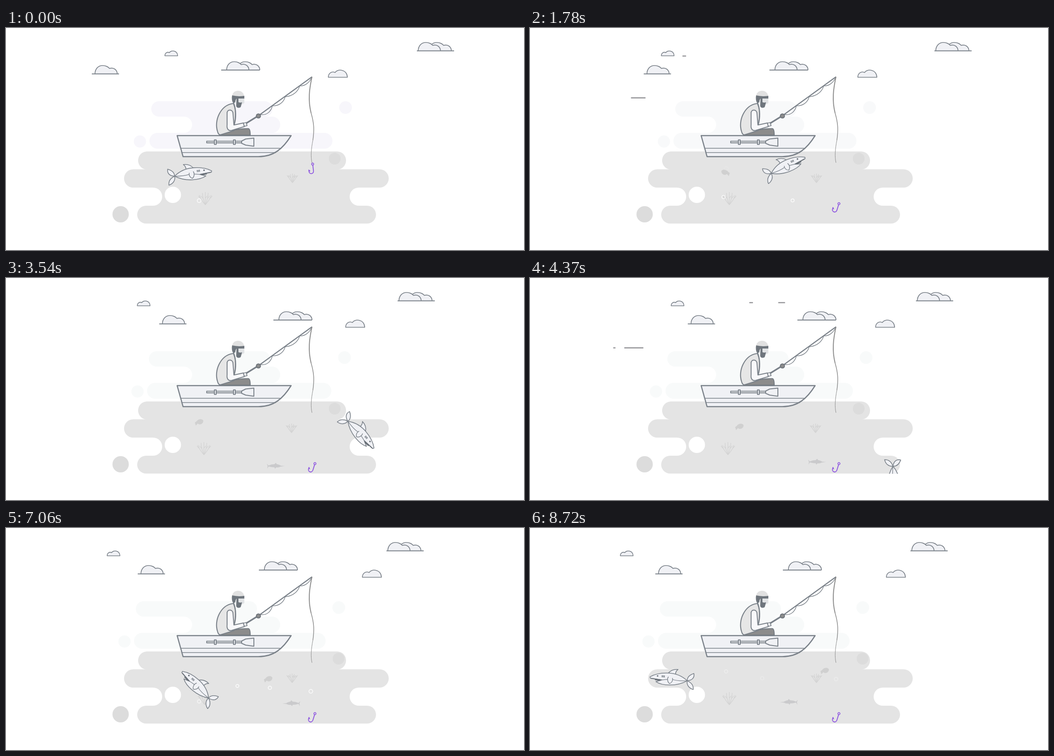
Animation, 1141 px wide and 491 px high, one loop 8820 ms. Source, as an HTML page with a canvas:

```html
<!DOCTYPE html>
<html lang="en">
<head>
<meta charset="utf-8">
<title>Fishing</title>
<style>
html, body { margin: 0; width: 100%; height: 100%; overflow: hidden; background: #fff; }
canvas { display: block; }
</style>
</head>
<body>
<canvas id="stage" width="1141" height="491"></canvas>
<script>
const ctx = document.getElementById('stage').getContext('2d');
const LOOP = 8820;
const INK = '#7a8189', PAPER = '#f0f1f5', WATER = '#e4e4e4', SHADE = '#dcdcdc', GREY = '#8c8c8c';

const clamp = u => Math.max(0, Math.min(1, u));
const smooth = u => u * u * (3 - 2 * u);
const easeOut = (u, power) => 1 - (1 - u) ** power;
const random = seed => Math.abs(Math.sin(seed * 12.9898) * 43758.5453) % 1;
const radians = degrees => degrees * Math.PI / 180;

// Eases through time, value pairs and rests at each of them.
function track(t, ...keys) {
  let value = keys[1];
  for (let i = 2; i < keys.length; i += 2) {
    const u = clamp((t - keys[i - 2]) / (keys[i] - keys[i - 2]));
    value += (keys[i + 1] - keys[i - 1]) * smooth(u);
  }
  return value;
}

function shape(d, fill, stroke, width = 1.8) {
  const path = new Path2D(d);
  if (fill) { ctx.fillStyle = fill; ctx.fill(path); }
  if (stroke) { ctx.strokeStyle = stroke; ctx.lineWidth = width; ctx.stroke(path); }
}

function pill(x0, x1, y0, y1, fill) {
  ctx.fillStyle = fill;
  ctx.beginPath();
  ctx.roundRect(x0, y0, x1 - x0, y1 - y0, (y1 - y0) / 2);
  ctx.fill();
}

function circle(x, y, r, fill, stroke, width) {
  ctx.beginPath();
  ctx.arc(x, y, r, 0, Math.PI * 2);
  if (fill) { ctx.fillStyle = fill; ctx.fill(); }
  if (stroke) { ctx.strokeStyle = stroke; ctx.lineWidth = width; ctx.stroke(); }
}

function placed(x, y, draw, { angle = 0, sx = 1, sy = 1 } = {}) {
  ctx.save();
  ctx.translate(x, y);
  ctx.scale(sx, sy);
  ctx.rotate(angle);
  draw();
  ctx.restore();
}

// Sky

function drawHaze(t) {
  const drift = track(t, 2750, 0, 5930, 1);
  const mix = track(t, 0, 0, 2600, 1);
  const tint = `rgb(${247 + mix}, ${246 + 4 * mix}, ${251 - mix})`;
  const far = 34 * drift, near = 15 * drift;
  pill(320 - far, 587 - far, 162, 196, tint);
  pill(450, 604, 196, 232, tint);
  pill(316 - far, 719 - near, 232, 267, tint);
  ctx.fillStyle = tint;
  ctx.fillRect(385, 195, 150, 38);
  pill(340, 410, 196, 232, '#fff');
  circle(295 - far, 251, 13.5, tint);
  circle(748 - near, 176, 14, tint);
}

const hump = x => placed(x, 0, () =>
  shape('M0 0C0 -11 7 -18.5 17 -18.5C24 -18.5 30 -15 32 -12C41 -15 49 -9 49 0', PAPER, INK, 1.7));

function bank(x, y, humps, left, right) {
  placed(x, y, () => {
    humps.forEach(hump);
    shape(`M${left} 0H${right}`, null, INK);
  });
}

function puff(x, y, scale) {
  placed(x, y, () => shape('M0 0C0 -9 7 -14 15 -10.5C19 -19 41 -19 42 0Z', PAPER, INK, 1.6 / scale),
    { sx: scale, sy: scale });
}

function drawClouds(t) {
  bank(track(t, 0, 908, 6000, 841), 50.5, [24, 0], -3, 79);
  bank(track(t, 900, 486, 2750, 601, 4370, 601, 5900, 569), 93, [24, 0], -12, 73);
  bank(track(t, 0, 196, 4200, 355, 8200, 283), 101.5, [0], -7, 53);
  puff(track(t, 0, 710, 7000, 785), 109, 1);
  puff(track(t, 0, 350, 2700, 267, 4370, 311, 8200, 199), 61.5, .67);
}

// A dash blown along a line, with an optional smaller dash lagging behind it.
function gust(t, start, end, y, from, to, length, { width = 2.4, tail = 0, lag = 0 } = {}) {
  const u = (t - start) / (end - start);
  if (u <= 0 || u >= 1) return;
  const head = from + (to - from) * smooth(u);
  const dash = (right, size) =>
    right > from && shape(`M${Math.max(from, right - size)} ${y}H${right}`, null, '#929296', width);
  dash(head, length);
  if (tail) dash(head - lag * (1 + u / 2), tail);
}

function drawGusts(t) {
  gust(t, 1540, 2760, 154.5, 171, 992, 32);
  gust(t, 3950, 6150, 154.5, 171, 992, 42, { tail: 5, lag: 56 });
  gust(t, 1540, 2100, 62, 320, 380, 8);
  gust(t, 3950, 4750, 54.5, 400, 700, 15, { tail: 8, lag: 56 });
  gust(t, 5800, 6400, 84.5, 250, 460, 14, { width: 1.6 });
}

// Sea

function drawSea(t) {
  pill(291, 749, 273, 313, WATER);
  pill(260, 843, 312.5, 353, WATER);
  ctx.fillStyle = WATER;
  ctx.fillRect(310, 300, 420, 30);
  ctx.fillRect(310, 340, 480, 70);
  pill(289, 815, 393, 432.5, WATER);
  pill(270, 344, 353, 393, '#fff');
  pill(757, 835, 353, 393, '#fff');
  circle(367.5, 369, 18, '#fff');
  circle(252.5, 412, 18, SHADE);
  circle(track(t, 4300, 724, 5930, 732.5), 289, 13, SHADE);
}

function drawWeed(x, y, size) {
  for (let i = -2; i <= 2; i++) {
    const tipX = x + i * size * .23, tipY = y - size * (1 - .06 * i * i);
    const midX = x + i * size * .2, midY = y - size * .45;
    shape(`M${x} ${y}Q${midX} ${midY} ${tipX} ${tipY}M${midX} ${midY - 2}l${i < 0 ? -4 : 4} -5`, null, '#d3d3d3', 1.3);
  }
}

function drawWeeds(t) {
  const sway = track(t, 1780, 0, 2710, -3, 4370, -3, 8720, 0);
  drawWeed(439 + sway, 391, 28);
  drawWeed(631 + sway * .7, 342, 20);
}

function drawFish(t) {
  const since = t - 2710;
  ctx.globalAlpha = clamp((t - 300) / 700);
  placed(390 + .0432 * Math.abs(since), 327.5 - 13.5 * Math.cos(since * Math.PI / 3220), () =>
    shape('M-4 3C-1 8 8 6 9 -1C8 -7 -2 -7 -6 -2L-10 0L-9 7Z', '#d0d0d0'),
    { angle: -.15, sx: track(t, 2600, -1, 3000, 1) });

  const u = (t - 5930) / 2790;
  const x = u < 0 ? 704 + 128 * u : 704 - 134 * easeOut(clamp(u), 1.6);
  ctx.globalAlpha = clamp((t - 3000) / 500);
  placed(x, 390 - (u < 0 ? 30 : 5) * u, () =>
    shape('M-20 -5L-16 -1Q-10 -4 -3 -4L0 -7L2 -4Q8 -3 11 -.5L20 0L10 1.5Q6 4 1 3L-2 6L-3 3Q-10 3 -16 1L-19 6L-18 0Z', '#cacacc'),
    { sx: track(t, 5600, 1, 6120, -1) });
  ctx.globalAlpha = 1;
}

// Every wave sends one bubble up from each vent; the first vent leads.
const VENTS = [425, 506, 578, 669], WAVES = [-100, 1480, 4800, 5950, 7000];

function drawBubbles(t) {
  WAVES.forEach((start, wave) => VENTS.forEach((x, vent) => {
    const chance = random(wave * VENTS.length + vent + 1);
    const age = t - start - (vent && 120 + 400 * chance);
    const life = vent ? 1500 : 1950;
    if (age <= 0 || age >= life) return;
    ctx.globalAlpha = .9 * Math.min(1, age / 80, (life - age) / 500);
    circle(x + age * .004, 386 - age * .04, 3.2 + chance, null, '#fff', 1.5);
  }));
  ctx.globalAlpha = 1;
}

function drawHook(t) {
  placed(track(t, 0, 675.5, 1500, 680.5), track(t, 0, 301, 2500, 410.5), () => {
    circle(0, 0, 2.3, null, '#8f58e0', 1.7);
    shape('M0 2.5V15C0 22.5 -10 22.5 -10 15V12L-7.5 15', null, '#8f58e0', 1.9);
  }, { angle: track(t, 0, -.12, 1500, .3) });
}

// Swims to the right and dives, then surfaces heading left and glides to rest.
function sharkPose(t) {
  if (t < 5250) {
    const u = (t - 2500) / 1870;
    return {
      x: track(t, 0, 412, 4100, 801),
      y: 297 + (u > 0 ? 160 * u * u : -19 * u),
      pitch: track(t, 0, -7.6, 1780, -25, 2710, 4.8, 4370, 88),
      facing: 1
    };
  }
  const u = Math.min(1, (t - 5930) / 2470);
  return {
    x: 569 - 263.5 * easeOut(u, 1.4),
    y: 433 - 99 * easeOut(u, 3.3),
    pitch: track(t, 7060, -45, 8400, -5.4),
    facing: -1
  };
}

function drawSharkBody() {
  shape('M-41 0C-40 -8 -46 -14 -54 -17.5C-57 -9 -52 -2 -41 0C-50 3 -56 9 -56 18C-46 16 -40 9 -41 0Z', PAPER, INK, 1.6);
  shape('M-14 -11Q-13 -18 -18.5 -23Q-5 -23 2 -13Z', PAPER, INK, 1.6);
  shape('M-41 0C-27 -11 -12 -14 3 -13C20 -12 33 -7 41.5 -1L40.5 2L15 3.5L27.5 8.5C14 16 -18 16 -41 0Z', PAPER, INK, 1.6);
  shape('M-41 0Q-20 3 -8 0M2 1Q9 2 15 3.5', null, INK, 1.3);
  shape('M-8 -3C-10 3 -8 7 -3 10C2 7 4 0 1 -5', PAPER, INK, 1.4);
  shape('M15 3.5L39 2M18 5L30 4.5', null, '#666d75', 1.8);
  shape('M10 -7V-2.5M12.5 -7V-2.5M15 -7V-2.5', null, '#737a82', 1.6);
  circle(25, -4.5, 1.7, '#666d75');
}

function drawShark(t) {
  const { x, y, pitch, facing } = sharkPose(t);
  ctx.save();
  ctx.beginPath();
  ctx.rect(0, 0, 1141, 433);
  ctx.clip();
  placed(x, y, drawSharkBody, { angle: radians(pitch), sx: facing });
  ctx.restore();
}

// Boat and angler

function drawBoat() {
  shape('M377 238H628C610 267 590 284.5 556 284.5H390Z', PAPER, INK, 2.5);
  shape('M385 266H606M388 275.5H595', null, INK, 1.7);
  shape('M442 250.5H520V254H442Z', '#fff', INK, 1.8);
  shape('M519 250L528 245.5L546 243.5V261.5L528 259L519 255Z', PAPER, INK, 2);
  for (const x of [459, 501]) shape(`M${x} 247.5h4v10h-4Z`, PAPER, INK, 2);
}

function drawAngler() {
  shape('M470 237L472 231C490 228 512 222 534 222.5Q538 223 538 237Z', GREY, '#747b82', 2);
  shape('M500 167C472 171 458 205 466 229Q468 237 473 236L502 227L503 213C507 199 507 181 502 167Z', '#e6e6e6', INK, 2.2);
  shape('M501 168C506 178 507 196 502 214', null, INK, 1.7);
  shape('M527 212L556 194', null, INK, 3.4);
  shape('M487 189C486 179 500 179 500 189L502 214.5L523 210L525 218L497 226.5C489 228 486 222 487 214Z', '#f8f8fa', INK, 2);
  shape('M523 210.5L529 209L531 216L525 217.5Z', '#f8f8fa', INK, 1.8);

  shape('M505 154H525V166L518 170H506Z', '#e2e4e6');
  shape('M498 150C500 135 522 135 524.5 150Z', '#e1e1e1');
  shape('M498 149Q511 152 525 150V156H512V164Q516 166 520 164L517 175Q510 179 507 173L508 156Q505 159 505 164L501 167Q496 160 498 149Z', '#6f767d');
}

function drawRod() {
  shape('M556 194L674 108', null, INK, 2.2);
  shape('M560 191C572 194 583 187 587 172C601 173 612 164 615 152C630 151 643 142 647 128C659 129 669 120 674 108', null, INK, 1.3);
  circle(556, 194.5, 4.6, GREY, '#6c737a', 2);
  shape('M674 108C668 135 665 160 672 188', null, GREY, 2);
  shape('M672 188C679 212 679 226 676 248', null, GREY, 1.5);
  shape('M676 248C672 268 671 285 674 298', null, GREY, 1);
}

function render(t) {
  ctx.fillStyle = '#fff';
  ctx.fillRect(0, 0, 1141, 491);
  drawHaze(t);
  drawClouds(t);
  drawGusts(t);
  drawSea(t);
  drawWeeds(t);
  drawFish(t);
  drawBubbles(t);
  drawShark(t);
  drawBoat();
  drawAngler();
  drawRod();
  drawHook(t);
}

ctx.lineJoin = 'round';
const begin = performance.now();
function tick() {
  render((performance.now() - begin) % LOOP);
  requestAnimationFrame(tick);
}
tick();
</script>
</body>
</html>
```
